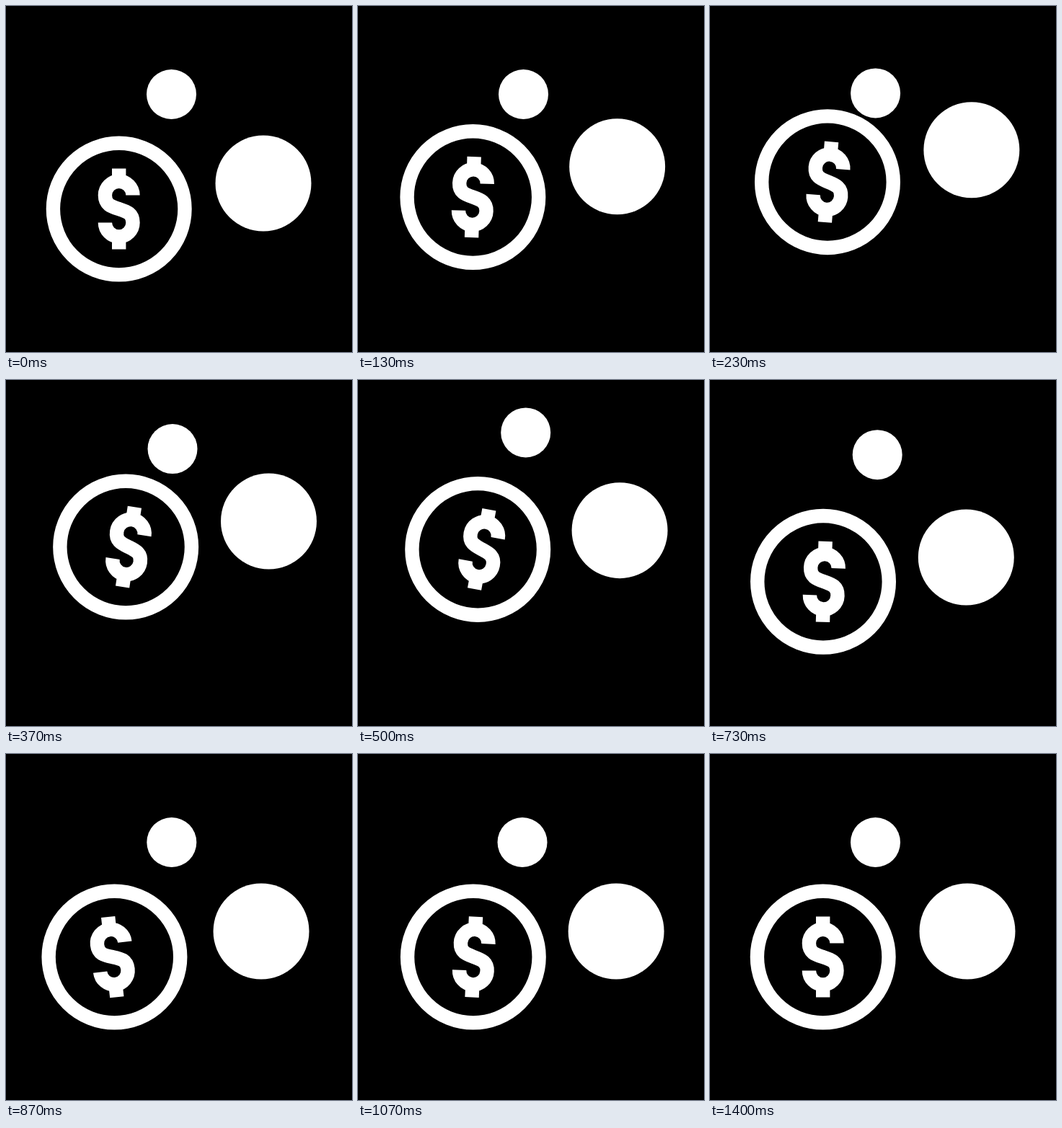
Write an HTML page that moves like this. It is 480x480 px and loops after 1.53 s.

```html
<!DOCTYPE html>
<html lang="en">
<head>
<meta charset="utf-8">
<title>Bouncing coin</title>
<style>
  html, body { margin: 0; width: 100%; height: 100%; overflow: hidden; background: #000; }
  svg { display: block; width: 100vw; height: 100vh; }
</style>
</head>
<body>
<svg viewBox="0 0 480 480">
  <circle id="small" r="34.5" fill="#fff"/>
  <circle id="big" r="66.5" fill="#fff"/>
  <g id="coin">
    <circle r="91.3" fill="none" stroke="#fff" stroke-width="19.4"/>
    <g id="dollar">
      <path d="M19.3 -19A19.3 19.3 0 0 0 -19.3 -19C-19.3 -6 -11 -3.5 0 0C11 3.5 19.3 6 19.3 19A19.3 19.3 0 0 1 -19.3 19"
            fill="none" stroke="#fff" stroke-width="19.4"/>
      <path d="M-9.7 -56h19.4v15h-19.4zM-9.7 41h19.4v15h-19.4z" fill="#fff"/>
    </g>
  </g>
</svg>
<script>
const LOOP = 1530, STEP = 100 / 3, LAST = 42, HEIGHT = 50;
const el = id => document.getElementById(id);

// Smooth 0 to 1 between steps a and b.
function ease(k, a, b) {
  const u = Math.min(1, Math.max(0, (k - a) / (b - a)));
  return u * u * (3 - 2 * u);
}

// One jump: rise, hang, drop.
const hop = (k, up, top, drop, land) =>
  HEIGHT * (ease(k, up, top) - ease(k, drop, land));

// A swing to one side that hangs, then rocks back with peaks shrinking by d.
const swing = (k, amp, d, start, peak, leave, back, again) => amp * (
  ease(k, start, peak)
  - (1 + d) * ease(k, leave, back)
  + (d + d * d) * ease(k, back, again)
  - d * d * ease(k, again, LAST));

function place(id, x, y, angle = 0) {
  el(id).setAttribute("transform", `translate(${x} ${y}) rotate(${angle})`);
}

function draw(ms) {
  const k = Math.min(LAST, Math.floor((ms % LOOP + 5) / STEP));
  place("small",
    229.5 + swing(k, 3.5, 0.46, 6, 17, 19, 31, 38),
    122.5 - hop(k, 6, 15.5, 17.8, 25));
  place("big",
    357 + swing(k, 7.5, 0.42, 0, 10, 12, 25, 33),
    246 - hop(k, 0, 8.4, 12.7, 19.7));
  place("coin",
    156.7 + swing(k, 9.5, 0.7, 0, 11.5, 16, 27, 33.5),
    281.6 - hop(k, 0, 10.4, 13.5, 23.1));
  place("dollar",
    swing(k, 5.5, 0.53, 4, 15, 17, 27, 33.5), 0,
    swing(k, 10.5, 0.64, 0, 15, 17, 27, 33.5));
}

const start = performance.now();
function tick() {
  draw(performance.now() - start);
  requestAnimationFrame(tick);
}
tick();
</script>
</body>
</html>
```
